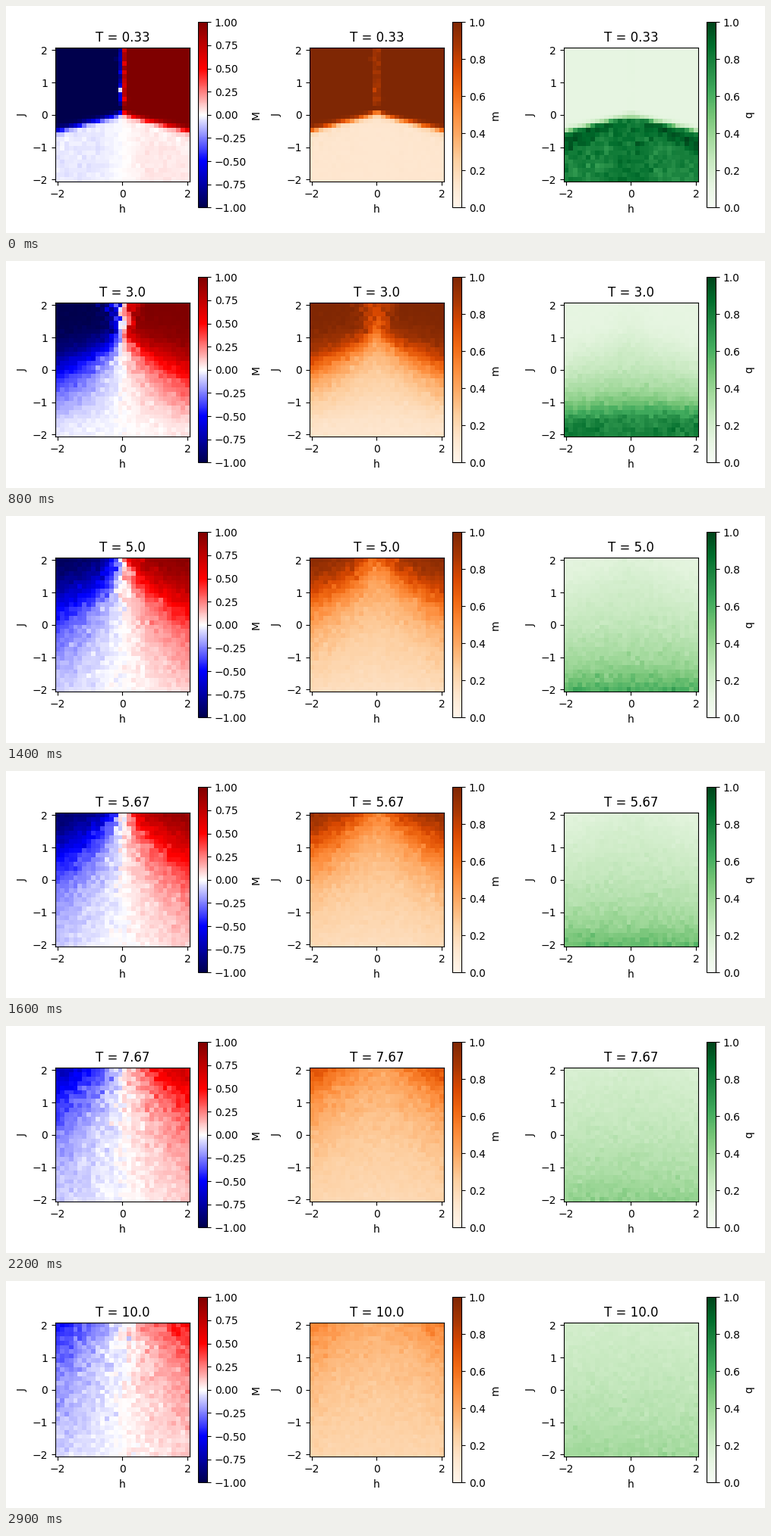
A matplotlib script for the animation above (3000 ms loop, 1000 px wide and 300 px high).

```python
import numpy as np
import matplotlib.pyplot as plt
from matplotlib.animation import FuncAnimation

# One square Ising lattice per (h, J), quenched from random spins to each T.
SIZE, GRID, SWEEPS, FRAMES = 30, 30, 10, 30
AXIS = np.linspace(-2, 2, GRID, dtype=np.float32)
EDGE = 2 + 2 / (GRID - 1)
TEMPS = np.linspace(10 / FRAMES, 10, FRAMES)
FIELD, COUPLING = AXIS[None, :], AXIS[:, None]

HALF = SIZE // 2
BATCH = (HALF, HALF, GRID, GRID)
COUNT = HALF * HALF * GRID * GRID
# Heat-bath thresholds, drawn once and read from random offsets.
THRESHOLDS = np.random.default_rng(1).logistic(size=8 * COUNT).astype(np.float32) / 2

SITE = np.arange(SIZE)
CHECKER = ((-1) ** (SITE[:, None] + SITE))[:, :, None, None].astype(np.int8)


def update_sublattice(spins, a, b, temp, rng):
    i, j = SITE[a::2], SITE[b::2]
    near = sum(spins[np.ix_((i + di) % SIZE, (j + dj) % SIZE)]
               for di, dj in [(1, 0), (-1, 0), (0, 1), (0, -1)])
    start = rng.integers(THRESHOLDS.size - COUNT)
    noise = THRESHOLDS[start:start + COUNT].reshape(BATCH)
    up = FIELD + COUPLING * near > np.float32(temp) * noise
    spins[a::2, b::2] = 2 * up.astype(np.int8) - 1


def local_order(spins):
    """Mean absolute average over 3 x 3 neighbourhoods."""
    for axis in (0, 1):
        spins = spins + np.roll(spins, 1, axis) + np.roll(spins, -1, axis)
    return np.abs(spins).mean((0, 1)) / 9


def order_parameters(frame):
    rng = np.random.default_rng(frame)
    shape = (SIZE, SIZE, GRID, GRID)
    spins = 2 * rng.integers(2, size=shape, dtype=np.int8) - 1
    for _ in range(SWEEPS):
        for a, b in [(0, 0), (1, 1), (0, 1), (1, 0)]:
            update_sublattice(spins, a, b, TEMPS[frame], rng)
    return spins.mean((0, 1)), local_order(spins), local_order(spins * CHECKER)


fig = plt.figure(figsize=(10, 3), dpi=100)


def place(x, y, w, h):
    return fig.add_axes([x / 1000, 1 - (y + h) / 300, w / 1000, h / 300])


def panel(index, name, cmap, low):
    left = 64.9 + 335 * index
    ax = place(left, 55.3, 177, 177)
    image = ax.imshow(np.zeros((GRID, GRID)), cmap=cmap, vmin=low, vmax=1,
                      origin="lower", extent=[-EDGE, EDGE] * 2,
                      aspect="auto", interpolation="nearest")
    ax.set(xlabel="h", ylabel="J", xticks=[-2, 0, 2], yticks=range(-2, 3))
    bar = place(left + 188, 21.3, 12.25, 245)
    fig.colorbar(image, cax=bar, label=name)
    return image, ax.set_title("")


panels = [panel(0, "M", "seismic", -1), panel(1, "m", "Oranges", 0),
          panel(2, "q", "Greens", 0)]


def update(frame):
    for (image, title), values in zip(panels, order_parameters(frame)):
        image.set_data(values)
        title.set_text(f"T = {round(TEMPS[frame], 2)}")
    return [artist for pair in panels for artist in pair]


anim = FuncAnimation(fig, update, frames=FRAMES, interval=100,
                     repeat=True, blit=False)
plt.show()
```
